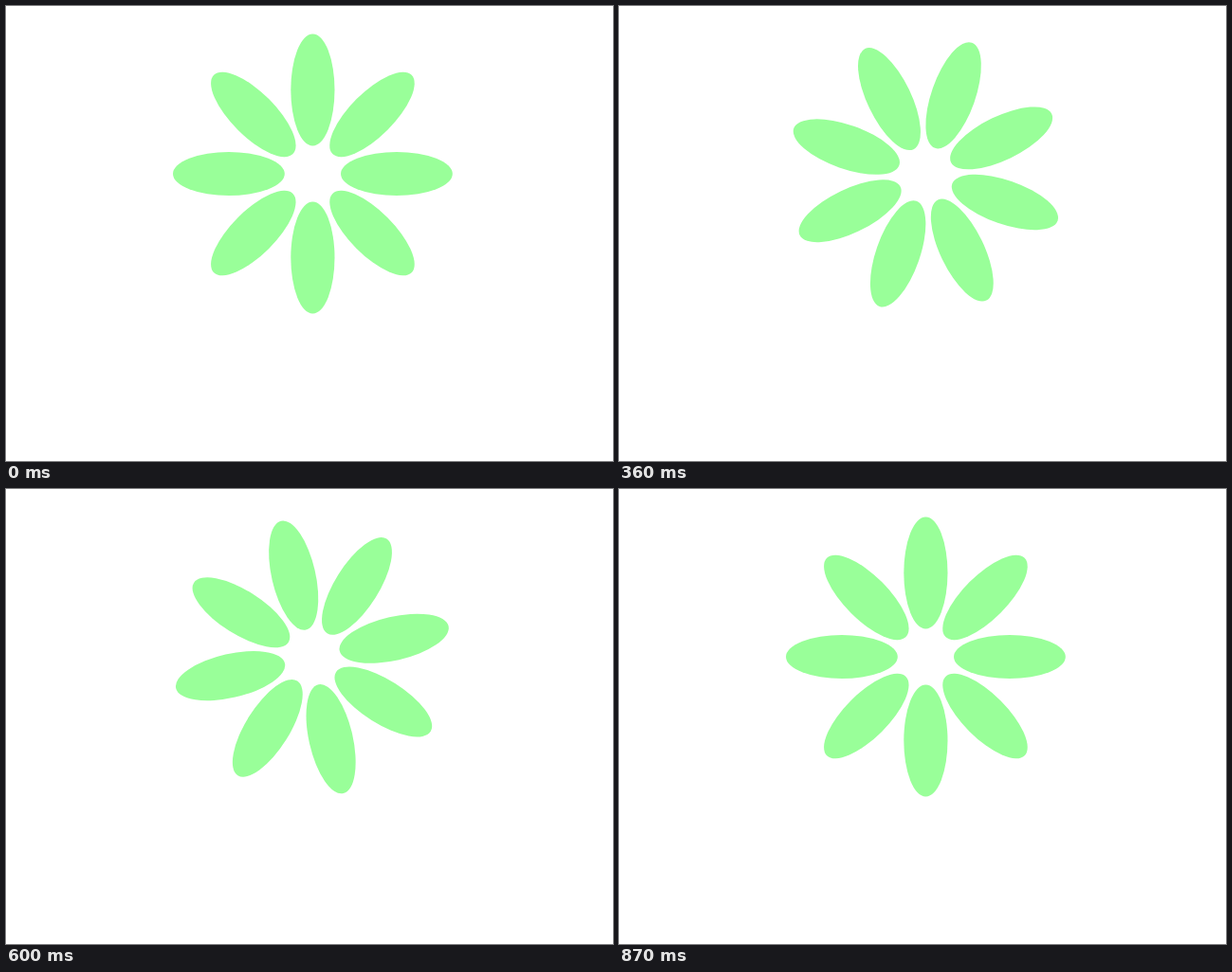
Recreate the animation shown at these times as an HTML page. Size 640 by 480 pixels, loop 900 ms.

```html
<!DOCTYPE html>
<html lang="en">
<head>
<meta charset="utf-8">
<title>Turning flower</title>
<style>
  html, body { margin: 0; width: 100%; height: 100%; overflow: hidden; background: #fff; }
  svg { display: block; width: 640px; height: 480px; }
</style>
</head>
<body>
<svg viewBox="0 0 640 480">
  <g id="flower" fill="#99ff99"></g>
</svg>
<script>
const LOOP = 900, STEP = 30, TURN_STEPS = 28;
const PETALS = 8, RADIUS = 88.5;
const PIVOT = { x: 323.3, y: 177.4 };
const flower = document.getElementById('flower');

for (let i = 0; i < PETALS; i++) {
  const petal = document.createElementNS('http://www.w3.org/2000/svg', 'ellipse');
  petal.setAttribute('cy', -RADIUS);
  petal.setAttribute('rx', 23.1);
  petal.setAttribute('ry', 58.9);
  petal.setAttribute('transform', `rotate(${i * 360 / PETALS})`);
  flower.append(petal);
}

// One full turn in even steps, then a one-step rest; the hub sits slightly off the pivot.
function draw(time) {
  const step = Math.min(Math.floor((time % LOOP) / STEP), TURN_STEPS);
  const angle = step * 360 / TURN_STEPS;
  flower.setAttribute('transform',
    `translate(${PIVOT.x} ${PIVOT.y}) rotate(${angle}) translate(0.1 -0.4)`);
}

let start;
function tick(now) {
  start ??= now;
  draw(now - start);
  requestAnimationFrame(tick);
}
draw(0);
requestAnimationFrame(tick);
</script>
</body>
</html>
```
